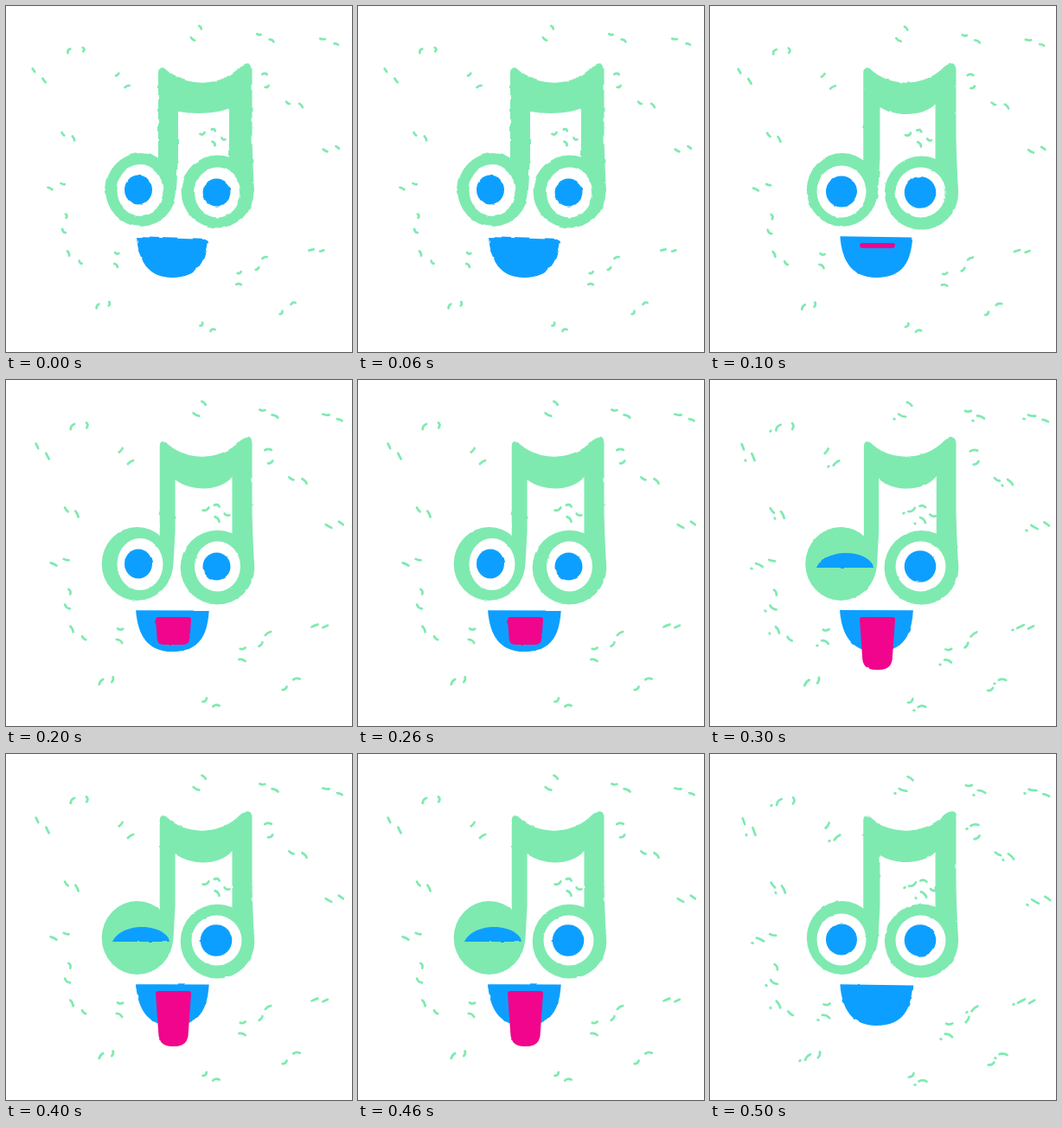
An HTML page for the animation above (600 ms loop, 400 by 400 pixels).

```html
<!DOCTYPE html>
<html lang="en">
<head>
<meta charset="utf-8">
<title>Winking music note</title>
<style>
  html, body { margin: 0; width: 100%; height: 100%; overflow: hidden; background: #fff; }
  #strip {
    display: flex; width: 600vw; height: 100vh;
    animation: flip 600ms steps(6) infinite;
  }
  #strip svg { flex: none; display: block; width: 100vw; height: 100vh; overflow: hidden; }
  @keyframes flip { to { transform: translateX(-600vw); } }
  .green { fill: #7eeab0; }
  .white { fill: #fff; }
  .blue { fill: #0d9fff; }
  .pink { fill: #f0058c; }
  .fleck { fill: none; stroke: #7eeab0; stroke-width: 2.7; stroke-linecap: round; }
</style>
</head>
<body>
<div id="strip"></div>
<script>
// Each pose: confetti drift, tongue length, eyes wide open, left eye winking
const poses = [
  { drift: -4, tongue: 0, wide: 0 },
  { drift: -2, tongue: 6, wide: 1 },
  { drift: 0, tongue: 32, wide: 0 },
  { drift: 2, tongue: 61, wide: 1, wink: true },
  { drift: 0, tongue: 64, wide: 1, wink: true },
  { drift: 3, tongue: 0, wide: 1 }
];

// Confetti gathers in pairs around these spots
const spots = [
  [220, 40], [311, 42], [370, 40], [77, 54], [48, 88], [144, 95], [303, 81], [345, 117],
  [82, 155], [231, 149], [244, 161], [373, 169], [55, 213], [71, 262], [76, 288], [131, 302],
  [357, 284], [303, 293], [273, 324], [336, 346], [110, 349], [243, 377]
];

const path = (cls, d, more = '') => `<path class="${cls}" d="${d}" ${more}/>`;
const oval = (cls, x, y, rx, ry = rx) =>
  `<ellipse class="${cls}" cx="${x}" cy="${y}" rx="${rx}" ry="${ry}"/>`;

// Repeatable value in -1..1
function rand(n) {
  const s = Math.sin(n * 127.1 + 11.7) * 43758.5453;
  return (s - Math.floor(s)) * 2 - 1;
}

function fleck(x, y, angle, len, bend = 0) {
  const h = len / 2;
  return path('fleck', `M${-h} 0Q0 ${bend} ${h} 0`,
    `transform="translate(${x} ${y}) rotate(${angle})"`);
}

function confetti(drift) {
  const len = 7.5 + drift * 0.5;
  return spots.map(([sx, sy], i) => {
    const x = sx + drift, y = sy + drift / 2;
    const tilt = 65 * rand(i) + drift * 4 * rand(i + 30);
    const turn = Math.PI * rand(i + 60), gap = 15 + 3 * rand(i + 90);
    const bend = 3 * rand(i + 120);
    const crumb = Math.abs(rand(i + 150)) < drift / 3;
    return fleck(x, y, tilt, len, bend) +
      fleck(x + gap * Math.cos(turn), y + gap * Math.sin(turn), tilt + 40 * bend / 3, len * 0.8, -bend) +
      (crumb ? fleck(x - 9, y + 4, tilt, 1) : '');
  }).join('');
}

// Stems, beam and heads; s = 1 is the squashed shape, 0 the relaxed one
function note(s) {
  const left = 178 - 2 * s, inL = 195 + 4 * s, inR = 262 - 4 * s;
  const underL = 114 + 8 * s, underR = 111 + 7 * s, dip = 130 - 5 * s;
  return path('green',
    `M${left} 212V77Q${left} 69 ${left + 7} 72C207 94 247 95 271 70Q284 61 284.5 74` +
    `V150Q285 180 287 214H${inR}V${underR}` +
    `C${inR - 14} ${dip} ${inL + 17} ${dip} ${inL} ${underL}V175` +
    `L${inL - 2} 212Q${inL - 4} 240 168 251Z`) +
    oval('green', 151 + 5 * s, 212.5, 41, 42.5) +
    oval('green', 244.5, 217 - 2.5 * s, 43 - s, 43 - s);
}

function eyes({ wide, wink }) {
  const lid = 'M123 217C132 196 176 194 188 213L189 217Z';
  const leftEye = wink ? path('blue', lid) :
    oval('white', 155 - 3 * wide, 213 + 1.5 * wide, 26.5 + 2 * wide, 30) +
    oval('blue', 153 - wide, 212.5 + 2 * wide, 16 + 2 * wide, 17 + wide);
  return leftEye +
    oval('white', 244.5 - wide, 215.5, 26.5 + 2.5 * wide, 29) +
    oval('blue', 243.5 - wide / 2, 215.5, 16 + 2.3 * wide);
}

function mouth(s) {
  const l = 150 + s, r = 235 - 2 * s, t = 266 + s;
  return path('blue', `M${l} ${t}L${r} ${t + 3 * s}C${r - 2} 294 ${r - 10} 314 192 314` +
    `C${l + 13} 314 ${l + 2} 294 ${l} ${t}Z`);
}

function tongue(len) {
  if (!len) return '';
  const l = 173, r = 214, t = 274, b = t + len;
  const taper = len / 20, k = Math.max(3, len / 4);
  return path('pink', `M${l + 3} ${t}H${r - 3}Q${r} ${t} ${r} ${t + 3}` +
    `L${r - taper} ${b - k}Q${r - taper} ${b} ${r - taper - k} ${b}` +
    `H${l + taper + k}Q${l + taper} ${b} ${l + taper} ${b - k}` +
    `L${l} ${t + 3}Q${l} ${t} ${l + 3} ${t}Z`);
}

function draw(pose, i) {
  const squash = Math.exp(-Math.min(i, poses.length - i));
  return `<svg viewBox="0 0 400 400">
    <filter id="rough${i}" filterUnits="userSpaceOnUse" x="0" y="0" width="400" height="400"
      color-interpolation-filters="sRGB">
      <feTurbulence type="fractalNoise" baseFrequency=".08" numOctaves="2" seed="${i + 3}"/>
      <feDisplacementMap in="SourceGraphic" scale="${2 + squash}" xChannelSelector="R" yChannelSelector="G"/>
    </filter>
    ${confetti(pose.drift)}
    <g filter="url(#rough${i})">
      ${note(squash)}${eyes(pose)}${mouth(squash)}${tongue(pose.tongue)}
    </g>
  </svg>`;
}

document.getElementById('strip').innerHTML = poses.map(draw).join('');
</script>
</body>
</html>
```
